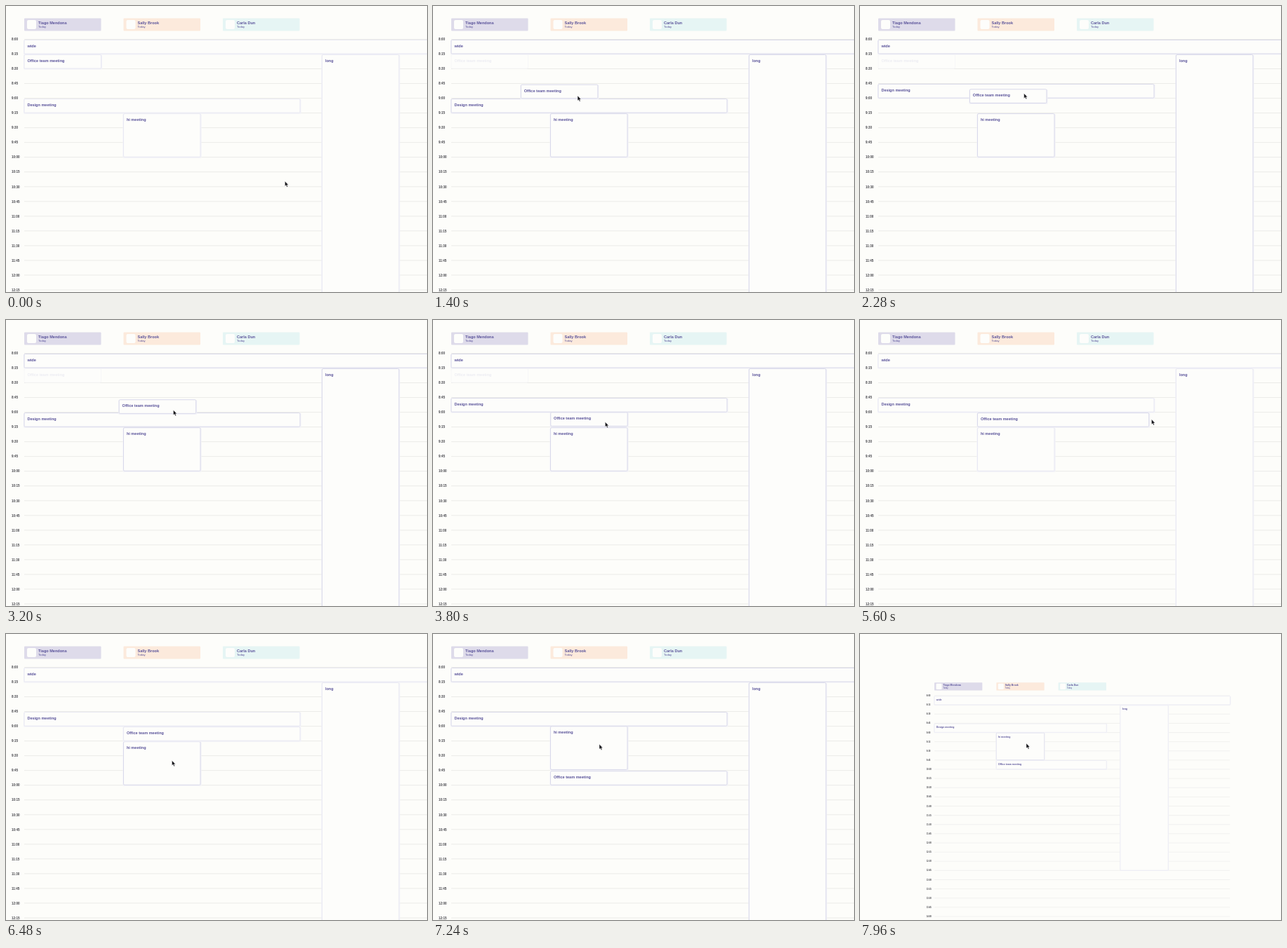
These frames come from a looping animation (600 by 408 pixels, 8000 ms). An HTML page:

```html
<!DOCTYPE html>
<html lang="en">
<head>
<meta charset="utf-8">
<title>Schedule</title>
<style>
  html, body { margin: 0; width: 100%; height: 100%; overflow: hidden; background: #fdfdfa; }
  svg { display: block; width: 600px; height: 408px; }
  text { font-family: "Liberation Sans", Arial, sans-serif; fill: #5a539a; }
  .bold { font-weight: bold; font-size: 5.55px; }
  .small { font-size: 4.2px; }
  .hour { font-weight: bold; font-size: 4.5px; fill: #44444a; }
  .line { stroke: #ebebe8; stroke-width: 1; }
  .shade { fill: #f1f1f7; }
  .card { fill: #fdfdfb; stroke: #e9e9f3; stroke-width: 1; }
  .strong .card { stroke: #d9d9ea; }
  .ghost .card { stroke: #f7f7f8; }
  .ghost .shade { fill: none; }
  .ghost text { fill: #ececf2; }
</style>
</head>
<body>
<svg viewBox="0 0 600 408">
  <g id="board"></g>
  <path id="cursor" d="M0 0V7L1.6 5.6 2.8 8.2 4 7.7 2.9 5.2H5Z" fill="#15151a" stroke="#fdfdfa" stroke-width=".4"/>
</svg>
<script>
const LOOP = 8000, ROW = 21.03, TOP = 47.5, COL = 141.5, LEFT = 26, CARD = 109.5;
const WIDE_CARD = 393, GRIP = { x: 77, y: 13 }, LAG = 45;
const DRAG = [440, 3900], RESIZE = [4800, 5700], LIFT = [6600, 7440], ZOOM = [7640, 7960];
const board = document.getElementById("board");
const cursor = document.getElementById("cursor");
const rowY = row => TOP + row * ROW;
const colX = col => LEFT + col * COL;
const during = (t, [from, to]) => t >= from && t < to;
const progress = (t, [from, to]) => Math.min(1, Math.max(0, (t - from) / (to - from)));

function add(parent, tag, attrs, content = "") {
  const node = document.createElementNS("http://www.w3.org/2000/svg", tag);
  for (const key in attrs) node.setAttribute(key, attrs[key]);
  node.textContent = content;
  return parent.appendChild(node);
}

function addHour(row) {
  const y = rowY(row);
  const label = `${8 + Math.floor(row / 4)}:${String(row % 4 * 15).padStart(2, "0")}`;
  add(board, "line", { class: "line", x1: 26, x2: 701, y1: y, y2: y });
  add(board, "text", { class: "hour", x: 8, y: y + 1.7 }, label);
}

function addPerson(name, fill, col) {
  const x = colX(col);
  add(board, "rect", { x, y: 17.5, width: CARD, height: 18, rx: 1, fill });
  add(board, "rect", { x: x + 4, y: 20, width: 13, height: 13, rx: 2, fill: "#fdfdfb" });
  add(board, "text", { class: "bold", x: x + 20, y: 25.8 }, name);
  add(board, "text", { class: "small", x: x + 20, y: 31.4 }, "Today");
}

function addEvent(title, col, row, width, rows) {
  const group = add(board, "g", {});
  const height = rows * ROW - 1.5;
  const shade = add(group, "rect", { class: "shade", x: -1, height: height + 1.5, rx: 1.5 });
  const card = add(group, "rect", { class: "card", height, rx: 1.5 });
  add(group, "text", { class: "bold", x: 4.4, y: 10.3 }, title);
  const event = {
    move: (x, y) => group.setAttribute("transform", `translate(${x} ${y})`),
    place: (c, r) => event.move(colX(c), rowY(r) + 1),
    style: name => group.setAttribute("class", name),
    show: visible => group.style.display = visible ? "" : "none",
    resize(w) {
      card.setAttribute("width", w);
      shade.setAttribute("width", w + 2.5);
    }
  };
  event.resize(width);
  event.place(col, row);
  return event;
}

for (let row = 0; row < 27; row++) addHour(row);
addPerson("Tiago Mendona", "#dedbea", 0);
addPerson("Sally Brook", "#fceadc", 1);
addPerson("Carla Dun", "#e6f5f4", 2);

const wide = addEvent("wide", 0, 0, 4 * COL + CARD, 1);
const long = addEvent("long", 3, 1, CARD, 18);
const design = addEvent("Design meeting", 0, 4, WIDE_CARD, 1);
const ghost = addEvent("Office team meeting", 0, 1, CARD, 1);
const hi = addEvent("hi meeting", 1, 5, CARD, 3);
const office = addEvent("Office team meeting", 0, 1, CARD, 1);
ghost.style("ghost");

// Places where the hand turns or rests.
const stops = [
  { t: 0, x: 397.5, y: 250 }, { t: 440, x: 103, y: 83 }, { t: 660, x: 91, y: 42 },
  { t: 1400, x: 206, y: 128 }, { t: 2060, x: 232, y: 148 }, { t: 2540, x: 235, y: 95 },
  { t: 3200, x: 238.5, y: 128.5 }, { t: 3900, x: 247, y: 146 }, { t: 4680, x: 269.5, y: 141 },
  { t: 5700, x: 419, y: 142 }, { t: 6480, x: 236.5, y: 180.5 }, { t: 6640, x: 236.5, y: 180.5 },
  { t: 7340, x: 237, y: 156 }, { t: 8000, x: 237, y: 156 }
];

function slope(i, axis) {
  if (!stops[i - 1] || !stops[i + 1]) return 0;
  const rate = n => (stops[n + 1][axis] - stops[n][axis]) / (stops[n + 1].t - stops[n].t);
  const before = rate(i - 1), after = rate(i);
  return before * after > 0 ? 2 * before * after / (before + after) : 0;
}

// Monotone cubic through the stops: smooth, without overshoot.
function pointer(t) {
  const i = Math.max(1, stops.findIndex(stop => stop.t >= t));
  const a = stops[i - 1], b = stops[i], span = b.t - a.t;
  const k = progress(t, [a.t, b.t]), ease = k * k * (3 - 2 * k);
  const on = axis => a[axis] + (b[axis] - a[axis]) * ease
    + span * k * (1 - k) * ((1 - k) * slope(i - 1, axis) - k * slope(i, axis));
  return { x: on("x"), y: on("y") };
}

function draw(t) {
  const hand = pointer(t), late = pointer(t - LAG);
  const dragging = during(t, DRAG), lifting = during(t, LIFT);
  const dropped = t >= DRAG[1];
  const mood = dragging || lifting ? "strong" : "";
  const held = { x: late.x - GRIP.x, y: late.y - GRIP.y };
  const rise = lifting ? late.y - 180.5 : t >= LIFT[1] ? -ROW : 0;

  [wide, long, design].forEach(event => event.style(mood));
  hi.style(mood || (t > 6300 ? "strong" : ""));
  office.style(mood || (during(t, [DRAG[1], RESIZE[1]]) ? "strong" : ""));

  ghost.show(dragging);
  design.place(0, dropped || dragging && held.y > 117.5 ? 3 : 4);
  hi.move(colX(1), rowY(5) + 1 + rise);

  if (dragging) office.move(held.x, held.y);
  else office.place(dropped ? 1 : 0, !dropped ? 1 : rise < -ROW / 2 ? 7 : 4);
  const stretched = Math.max(CARD, late.x - colX(1));
  office.resize(t >= RESIZE[1] ? WIDE_CARD - COL : during(t, RESIZE) ? stretched : CARD);

  cursor.setAttribute("transform", `translate(${hand.x} ${hand.y})`);
  const scale = Math.pow(.624, progress(t, ZOOM));
  board.setAttribute("transform", `translate(${238.8 * (1 - scale)} ${155.3 * (1 - scale)}) scale(${scale})`);
}

const start = performance.now();
function tick() {
  draw((performance.now() - start) % LOOP);
  requestAnimationFrame(tick);
}
tick();
</script>
</body>
</html>
```
